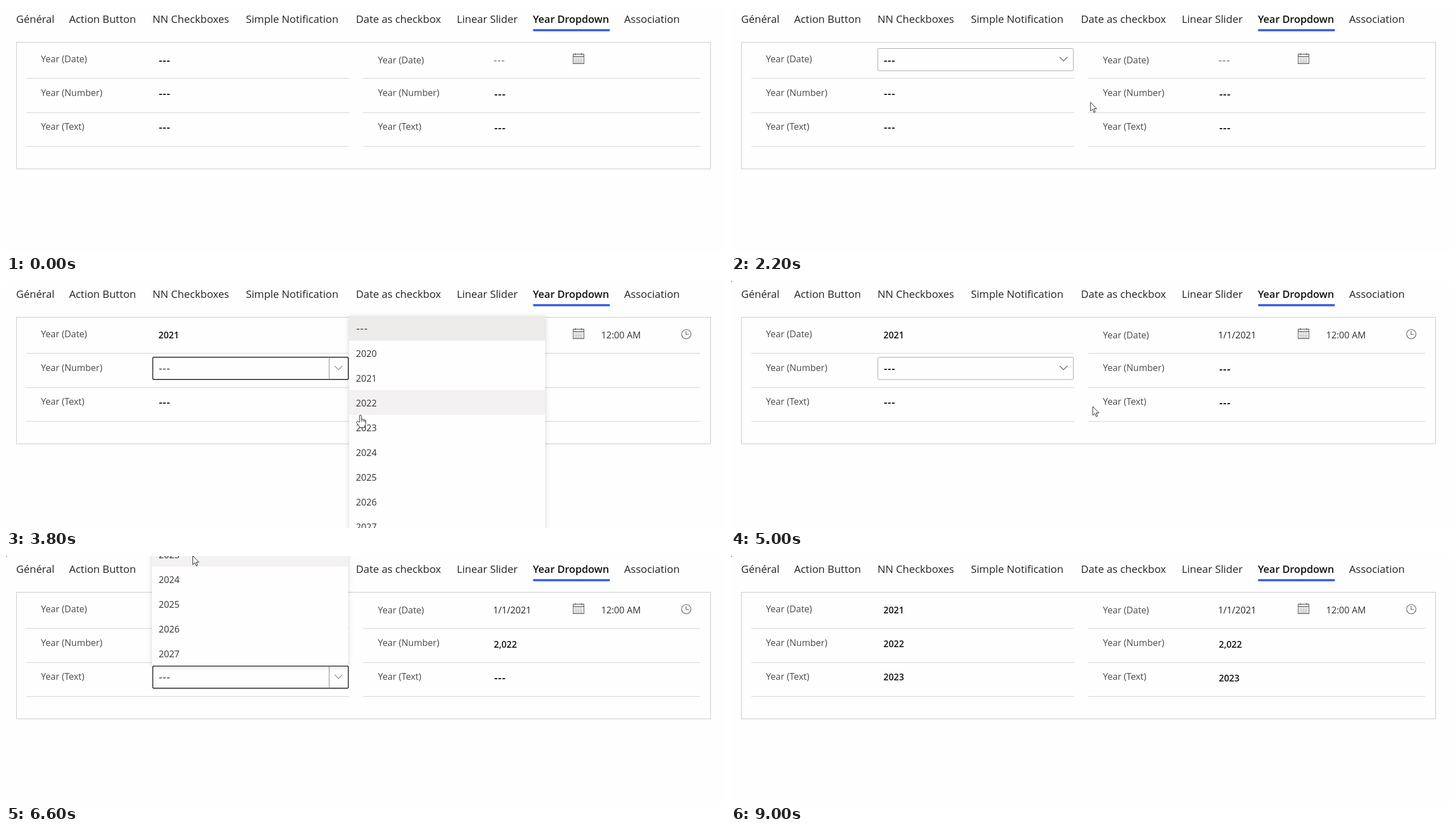
An HTML page for the animation above (9.4 s loop, 1276 px wide and 439 px high).

```html
<!DOCTYPE html>
<html lang="en">
<head>
<meta charset="utf-8">
<title>Year dropdown</title>
<style>
html, body { margin: 0; width: 100%; height: 100%; overflow: hidden; background: #fefefe; }
svg { display: block; font: 16.2px "Open Sans", "Noto Sans", sans-serif; fill: #323130; }
text { white-space: pre; }
.tab { font-size: 18.6px; fill: #242322; }
.tab.on { font-size: 18.2px; font-weight: 600; fill: #111; }
.label { fill: #4c4a48; font-size: 16.1px; }
.value { font-size: 16px; font-weight: 600; fill: #111; }
.plain { font-weight: 400; fill: #222; }
.dash { font-size: 19px; letter-spacing: .75px; transform: translate(.7px, .8px); }
.dim { fill: #666; }
.line { fill: none; stroke: #d3d2d1; }
.icon { fill: none; stroke: #54524f; stroke-width: 1.1; }
.list-bg { fill: #fefefe; filter: drop-shadow(0 2px 4px rgba(0,0,0,.17)); }
.cursor { fill: #fff; stroke: #222; stroke-linejoin: round; }
</style>
</head>
<body>
<svg id="stage" width="1276" height="439" viewBox="0 0 1276 439"></svg>
<script>
const LOOP = 9400, STEP = 200, ROW = 44;
const stage = document.getElementById('stage');

function add(parent, tag, attrs, text) {
  const el = document.createElementNS('http://www.w3.org/2000/svg', tag);
  for (const key in attrs) el.setAttribute(key, attrs[key]);
  if (text !== undefined) el.textContent = text;
  parent.appendChild(el);
  return el;
}
const label = (parent, x, y, cls, text) => add(parent, 'text', { x, y, class: cls }, text);
const show = (el, on) => el.setAttribute('visibility', on ? 'visible' : 'hidden');

// Tabs and frame
const tabs = [[18, 'Général'], [112, 'Action Button'], [260, 'NN Checkboxes'],
  [425.7, 'Simple Notification'], [621, 'Date as checkbox'], [800, 'Linear Slider'],
  [935, 'Year Dropdown'], [1097, 'Association']];
for (const [x, name] of tabs) label(stage, x, 30, name === 'Year Dropdown' ? 'tab on' : 'tab', name);
add(stage, 'rect', { x: 935, y: 41, width: 137, height: 4, rx: 2, fill: '#3d65e2' });
add(stage, 'rect', { x: 18.5, y: 64.5, width: 1232, height: 225, class: 'line', style: 'stroke:#c9c8c7' });
for (const y of [128.5, 189.5, 249.5])
  add(stage, 'path', { d: `M36 ${y}H608.5M634 ${y}H1232`, class: 'line' });
const dot = add(stage, 'rect', { width: 1.5, height: 1, fill: '#222' });

// Calendar and clock
let cal = 'M1006.6 85.6H1025.6V102.4H1006.6ZM1006.6 89.6H1025.6M1010.5 84V87M1021.5 84V87';
for (let r = 0; r < 4; r++)
  for (let c = 0; c < 5; c++) cal += `M${1009.2 + c * 3} ${92 + r * 2.7}h1.4`;
add(stage, 'path', { d: cal, class: 'icon' });
const time = add(stage, 'g', {});
label(time, 1056.3, 102, '', '12:00 AM');
add(time, 'circle', { cx: 1207.3, cy: 94.5, r: 8.3, class: 'icon' });
add(time, 'path', { d: 'M1206.8 89V95H1212', class: 'icon' });

// hover, open, shut, commit and blur are times in ms; list is the menu's resting corner
const fields = [
  { name: 'Year (Date)', left: '2021', right: '1/1/2021', y: 100, ry: 102, vy: 102, rvy: 102, top: 75.5,
    hover: 800, open: 1000, shut: 2200, commit: 2400, blur: 2800, list: [609, 62], slide: [-3, 0] },
  { name: 'Year (Number)', left: '2022', right: '2,022', y: 160, ry: 160, vy: 161.5, rvy: 162.7, top: 135.5,
    hover: 2800, open: 3200, shut: 4800, commit: 5200, blur: 5600, list: [609, 62], slide: [-3, 0] },
  { name: 'Year (Text)', left: '2023', right: '2023', y: 219.7, ry: 219.7, vy: 221.2, rvy: 222.5, top: 195.5,
    hover: 5400, open: 5800, shut: 7000, commit: 7200, blur: 8000, list: [259, -201], slide: [0, 3] }
];
fields.forEach((f, i) => {
  label(stage, 62, f.y, 'label', f.name);
  label(stage, 660, f.ry, 'label', f.name);
  f.box = add(stage, 'rect', { x: 260.5, y: f.top, width: 347, height: 39.5, rx: 2, fill: '#fefefe' });
  f.split = add(stage, 'path', { d: `M573.5 ${f.top}v39.5`, stroke: '#8a8886' });
  f.arrow = add(stage, 'path', { d: `M583.5 ${f.top + 15.5}l6.7 6.7 6.7-6.7`, class: 'icon' });
  f.leftText = label(stage, 270.5, f.vy, 'value');
  f.rightText = label(stage, i ? 865.8 : 864.5, f.rvy, '');
  f.rightClass = i ? 'value' : 'plain dim';
});

// Menu
const menu = add(stage, 'g', {});
add(menu, 'rect', { width: 348, height: 396, class: 'list-bg' });
add(menu, 'rect', { width: 348, height: ROW, fill: '#edeaea' });
const mark = add(menu, 'rect', { width: 348, height: ROW, fill: '#f4f1f3' });
for (let i = 0; i < 9; i++)
  label(menu, 12, i * ROW + 28.7, i ? '' : 'dash', i ? 2019 + i : '---');

// Pointer
const arrow = add(stage, 'path', { class: 'cursor',
  d: 'M.5 .5V16.3L4.1 12.9L6.7 18.6L9 17.6L6.5 12H11.4Z' });
const hand = add(stage, 'path', { class: 'cursor',
  d: 'M-1.7 13V2Q-1.6 .4 0 .4T1.7 2V7.6Q3.6 6.4 4.9 8.2Q6.9 7.3 7.7 9.2Q9.4 8.7 9.4 11V15.5Q9.2 18 7.6 19.5V22.5H-1.8V20.2L-6.8 14.2Q-7.6 12.4-6 11.6Q-4.6 11-3.2 12.6ZM1.7 7.6V12M4.9 8.2V12M7.7 9.2V12.5' });
const path = [[200, 1152, 330], [800, 357, 104], [1000, 357, 104], [1200, 372, 108],
  [1800, 634, 169], [2000, 637.5, 170.5], [2400, 637.5, 170.5], [2600, 600, 166], [2800, 500, 158],
  [3200, 430, 153], [3400, 500, 178], [3800, 629, 238], [4200, 641, 223], [5000, 641.5, 222.5],
  [5200, 620, 224], [5600, 440, 212], [5800, 430, 208], [6600, 331, -1], [7000, 331, -2],
  [7800, 578, 300], [8000, 588, 307], [8600, 588, 307], [8800, 585.5, 307]];
const handTimes = [[800, 2200], [2800, 4800], [5400, 6400]];

function pointAt(t) {
  let i = 1;
  while (i < path.length - 1 && path[i][0] < t) i++;
  const [t0, x0, y0] = path[i - 1], [t1, x1, y1] = path[i];
  const k = Math.max(0, Math.min(1, (t - t0) / (t1 - t0)));
  return [x0 + (x1 - x0) * k, y0 + (y1 - y0) * k];
}
const within = (t, a, b) => t >= a && t < b;

function setValue(el, text, cls) {
  el.textContent = text;
  el.setAttribute('class', text === '---' ? cls + ' dash' : cls);
}

function draw(t) {
  const [px, py] = pointAt(t);
  let active = null;
  for (const f of fields) {
    const open = within(t, f.open, f.shut), focus = within(t, f.hover, f.blur), done = t >= f.commit;
    if (open) active = f;
    const first = f === fields[0];
    show(f.box, focus);
    show(f.arrow, focus);
    show(f.split, open);
    f.box.setAttribute('stroke', !open ? '#a9a7a5' : first ? '#4a4846' : '#111');
    f.box.setAttribute('stroke-width', open && !first ? 1.4 : 1);
    f.arrow.style.stroke = open && !first ? '#8a8886' : '#54524f';
    setValue(f.leftText, done ? f.left : '---', open ? 'value plain' : 'value');
    setValue(f.rightText, done ? f.right : '---', done && first ? 'plain' : f.rightClass);
  }
  show(time, t >= fields[0].commit);
  show(dot, within(t, 1000, 2200) || t >= 5000);

  menu.setAttribute('display', active ? 'inline' : 'none');
  if (active) {
    const fresh = t < active.open + STEP, [lx, ly] = active.list, [sx, sy] = active.slide;
    menu.setAttribute('opacity', fresh ? 0.75 : 1);
    menu.setAttribute('transform', `translate(${fresh ? lx + sx : lx} ${fresh ? ly + sy : ly})`);
    const row = Math.floor((py - 4 - ly) / ROW);
    mark.setAttribute('display', px > lx && px < lx + 348 && row > 0 && row < 9 ? 'inline' : 'none');
    mark.setAttribute('y', row * ROW);
  }

  const seen = within(t, 200, 9000), isHand = handTimes.some(([a, b]) => within(t, a, b));
  show(hand, seen && isHand);
  show(arrow, seen && !isHand);
  for (const el of [hand, arrow]) el.setAttribute('transform', `translate(${px} ${py})`);
}

// The screen refreshes every 200 ms
const start = performance.now();
function tick() {
  const t = (performance.now() - start) % LOOP;
  draw(Math.floor(t / STEP) * STEP);
  requestAnimationFrame(tick);
}
tick();
</script>
</body>
</html>
```
